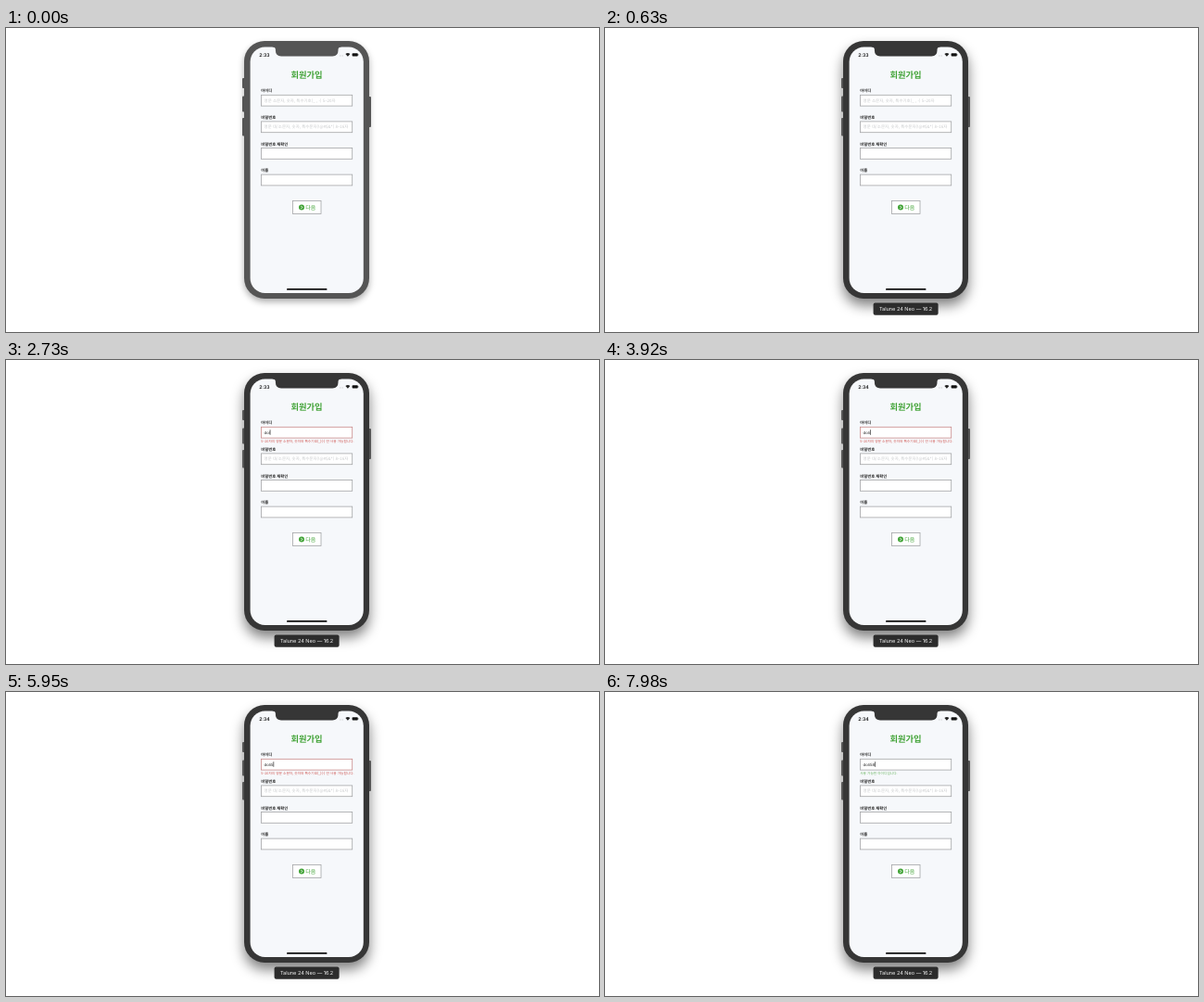
Write an HTML page that moves like this. It is 640x328 px and loops after 8000 ms.

```html
<!DOCTYPE html>
<html lang="ko">
<head>
<meta charset="utf-8">
<title>회원가입</title>
<style>
  html, body { margin: 0; width: 100%; height: 100%; overflow: hidden; background: #fff; }
  svg { display: block; width: 100vw; height: 100vh; }
  text { font-family: "Noto Sans CJK KR", "Noto Sans CJK", sans-serif; text-rendering: geometricPrecision; white-space: pre; }
  .latin { font-family: Inter, Roboto, sans-serif; }
  .label { font-size: 4.3px; font-weight: 700; fill: #222; }
  .hint { font-size: 4.45px; fill: #c6c8ca; }
  .note { font-size: 3.7px; }
  .box { fill: #fff; stroke: #a4a5a7; stroke-width: .8; }
  .green { fill: #41a336; }

  .bezel { fill: #555; animation: bezel 8s step-end infinite; }
  .soft { animation: soft 8s step-end infinite; }
  .deep { animation: deep 8s step-end infinite; }
  .device { animation: device 8s step-end infinite; }
  @keyframes bezel { 0% { fill: #555 } 7.87% { fill: #363636 } }
  @keyframes soft { 0% { opacity: 1 } 7.87% { opacity: 0 } }
  @keyframes deep { 0% { opacity: 0 } 7.87% { opacity: 1 } }
  @keyframes device { 0% { opacity: 0 } .87% { opacity: .6 } 1.75% { opacity: 1 } }
</style>
</head>
<body>
<svg viewBox="0 0 640 328">
  <defs>
    <filter id="blurSoft" x="-30%" y="-30%" width="160%" height="160%"><feGaussianBlur stdDeviation="3.6"/></filter>
    <filter id="blurDeep" x="-30%" y="-30%" width="160%" height="160%"><feGaussianBlur stdDeviation="7"/></filter>
    <rect id="body" x="257" y="14" width="135" height="278" rx="22"/>
  </defs>

  <use href="#body" class="soft" y="3.5" fill="#000" fill-opacity=".32" filter="url(#blurSoft)"/>
  <use href="#body" class="deep" y="7.5" fill="#000" fill-opacity=".5" filter="url(#blurDeep)"/>

  <g fill="#555">
    <rect x="255" y="54" width="4" height="11" rx="1"/>
    <rect x="255" y="73.5" width="4" height="17" rx="1"/>
    <rect x="255" y="97" width="4" height="19.5" rx="1"/>
    <rect x="390" y="74" width="4" height="33" rx="1"/>
  </g>
  <use href="#body" class="bezel"/>
  <rect x="263.6" y="20.5" width="122.2" height="265.5" rx="16" fill="#f6f8fb"/>
  <path class="bezel" d="M287.7 20h74v.5q-3.2 0-3.2 3v.8q0 6.1-6.1 6.1h-55.4q-6.1 0-6.1-6.1v-.8q0-3-3.2-3z"/>

  <text id="clock" class="latin" x="273.2" y="30.7" font-size="5.1" font-weight="600" fill="#111">2:33</text>
  <g fill="#999">
    <circle cx="360.6" cy="29.9" r=".4"/><circle cx="362" cy="29.9" r=".4"/><circle cx="363.4" cy="29.9" r=".4"/>
  </g>
  <path d="M366.4 28q2.5-2.2 5 0l-2.5 2.8z" fill="#222"/>
  <rect x="373.6" y="27.2" width="6.2" height="3.3" rx=".9" fill="#111"/>
  <rect x="380.1" y="28.2" width=".5" height="1.3" fill="#666"/>

  <text class="green" x="324.5" y="54.3" font-size="9.3" font-weight="700" text-anchor="middle">회원가입</text>

  <g id="fields"></g>
  <text class="hint" id="idHint" x="278.6" y="79.8">영문 소문자, 숫자, 특수기호(_ , -) 5~20자</text>
  <text class="hint" x="278.6" y="108.4">영문 대/소문자, 숫자, 특수문자(!@#$&amp;*) 8~16자</text>
  <text class="latin" id="typed" x="278.6" y="79.8" font-size="4.3" fill="#222"></text>
  <rect id="caret" y="75.2" width=".7" height="5.6" fill="#333"/>
  <text class="note" id="note" x="275.2" y="89.2"></text>

  <rect class="box" x="309.5" y="186.5" width="30.5" height="14"/>
  <circle class="green" cx="319" cy="193.5" r="3"/>
  <path d="M318.3 191.9l1.6 1.6-1.6 1.6" fill="none" stroke="#fff" stroke-width=".9"/>
  <text class="green" x="323.2" y="195.7" font-size="6" font-weight="500">다음</text>

  <rect x="303" y="281.1" width="43.5" height="1.7" rx=".85" fill="#111"/>

  <g class="device">
    <rect x="289.6" y="296.6" width="70" height="13.2" rx="2" fill="#2c2c2c"/>
    <text class="latin" x="324.6" y="305.2" font-size="5.55" fill="#f4f4f4" text-anchor="middle">Talune 24 Neo — 16.2</text>
  </g>
</svg>
<script>
  const LOOP = 8000;
  const NAME = 'doli58';
  const KEY_TIMES = [2030, 2310, 2730, 3920, 5950, 6790];
  const CARET_X = [278.4, 281.3, 283.3, 284.7, 286, 288.5, 291.1];
  // [time, visible, fade length]
  const BLINKS = [
    [770, 1, 0], [1370, 0, 170], [1860, 1, 100], [3460, 0, 110],
    [3920, 1, 0], [4450, 0, 170], [5000, 1, 110], [5560, 0, 110],
    [5950, 1, 0], [6540, 0, 110], [6790, 1, 0], [7390, 0, 170], [7870, 1, 110]
  ];
  const $ = id => document.getElementById(id);

  $('fields').innerHTML = ['아이디', '비밀번호', '비밀번호 재확인', '이름'].map((label, i) => {
    const y = i * 28.6;
    return `<text class="label" x="275.3" y="${69.4 + y}">${label}</text>
      <rect class="box" x="275.5" y="${72.3 + y}" width="98.2" height="11.8"/>`;
  }).join('');
  const idBox = document.querySelector('#fields .box');

  function caretOpacity(t) {
    const next = BLINKS.findLast(([start]) => start <= t);
    if (!next) return 0;
    const [start, visible, fade] = next;
    const p = fade ? Math.min(1, (t - start) / fade) : 1;
    return visible ? p : 1 - p;
  }

  function draw(now) {
    const t = now % LOOP;
    const count = KEY_TIMES.filter(k => k <= t).length;
    const valid = t >= 7070;
    const invalid = count > 0 && !valid;

    $('clock').textContent = t < 3500 ? '2:33' : '2:34';
    $('idHint').style.opacity = count ? 0 : 1;
    $('typed').textContent = NAME.slice(0, count);
    $('caret').setAttribute('x', CARET_X[count]);
    $('caret').style.opacity = caretOpacity(t);
    idBox.style.stroke = invalid ? '#c98a8a' : '';
    $('note').style.fill = invalid ? '#cf5550' : '#67b45e';
    $('note').textContent = valid ? '사용 가능한 아이디입니다.'
      : invalid ? '5~20자의 영문 소문자, 숫자와 특수기호(_)(-) 만 사용 가능합니다.' : '';
    requestAnimationFrame(draw);
  }
  requestAnimationFrame(draw);
</script>
</body>
</html>
```
